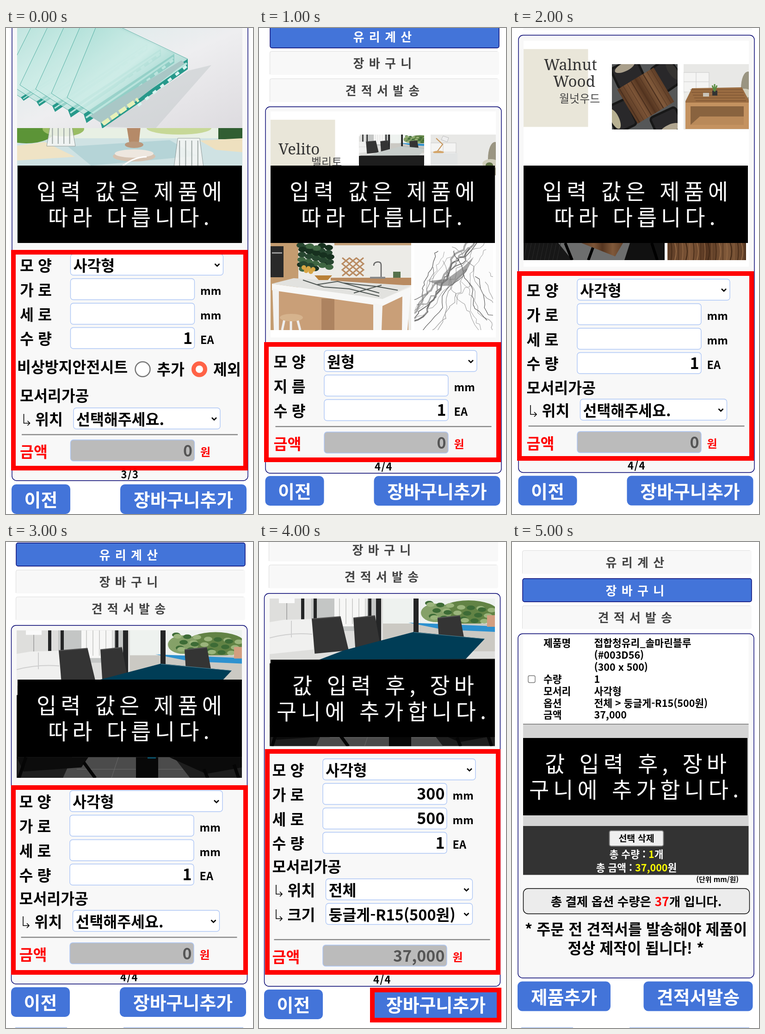
These frames come from a looping animation (534 px wide and 1049 px high, 6000 ms). An HTML page:

```html
<!DOCTYPE html>
<html lang="ko">
<head>
<meta charset="utf-8">
<style>
html, body { margin: 0; width: 100%; height: 100%; overflow: hidden; background: #fff; }
svg { display: block; }
#app { width: 100vw; height: 100vh; }
text { font-family: "Noto Sans CJK KR", "Noto Sans CJK", "Noto Sans", sans-serif; white-space: pre; }
.serif { font-family: "Noto Serif", serif; }
</style>
</head>
<body>
<svg id="app" viewBox="0 0 534 1049">
  <defs>
    <linearGradient id="glass" x1="0" y1="0" x2="1" y2="1">
      <stop offset="0" stop-color="#9fd8cf"/><stop offset=".5" stop-color="#d3efea"/><stop offset="1" stop-color="#5fb9ad"/>
    </linearGradient>
    <linearGradient id="wall" x1="0" y1="0" x2="1" y2="1">
      <stop offset="0" stop-color="#d5e9e8"/><stop offset=".5" stop-color="#eeeef0"/><stop offset="1" stop-color="#dddbdf"/>
    </linearGradient>
    <linearGradient id="wood">
      <stop offset="0" stop-color="#5b3b25"/><stop offset=".3" stop-color="#7d5537"/><stop offset=".5" stop-color="#553520"/>
      <stop offset=".75" stop-color="#80593a"/><stop offset="1" stop-color="#5e3d26"/>
    </linearGradient>
  </defs>
  <g id="stage"></g>
</svg>
<script>
const BLUE = '#4374d9', NAVY = '#000070', PANEL = '#f8f8f8', RED = '#f00';

// Basic shapes
const rect = (x, y, w, h, fill, more = '') =>
  `<rect x="${x}" y="${y}" width="${w}" height="${h}" fill="${fill}" ${more}/>`;
const poly = (fill, points, more = '') => `<polygon points="${points}" fill="${fill}" ${more}/>`;
const oval = (cx, cy, rx, ry, fill, more = '') =>
  `<ellipse cx="${cx}" cy="${cy}" rx="${rx}" ry="${ry}" fill="${fill}" ${more}/>`;
const line = (d, color, width, more = '') =>
  `<path d="${d}" fill="none" stroke="${color}" stroke-width="${width}" ${more}/>`;
const text = (x, y, s, size, fill = '#000', more = '') =>
  `<text x="${x}" y="${y}" font-size="${size}" font-weight="${size > 28 ? 900 : 700}" fill="${fill}" ${more}>${s}</text>`;
const mid = 'text-anchor="middle"', end = 'text-anchor="end"';
const repeat = (n, f) => Array.from({ length: n }, (_, i) => f(i)).join('');
const photo = (x, y, w, h, body, box = `0 0 ${w} ${h}`) =>
  `<svg x="${x}" y="${y}" width="${w}" height="${h}" viewBox="${box}">${body}</svg>`;

function random(seed) {
  return () => (seed = (seed * 16807) % 2147483647) / 2147483647;
}

// Interface parts
const panel = (x, y, bottom) =>
  rect(x, y, 510, bottom - y, PANEL, `rx="10" stroke="${NAVY}" stroke-width="1.4"`);
const frame = (x, y, w, h) => rect(x + 5, y + 5, w - 10, h - 10, 'none', `stroke="${RED}" stroke-width="10"`);
const button = (x, y, w, s) =>
  rect(x, y, w, 64, BLUE, 'rx="10"') + text(x + w / 2, y + 48, s, 39, '#fff', mid);
const buttons = (x, y) => button(x, y, 127, '이전') + button(x + 235, y, 273, '장바구니추가');
const footLines = () => rect(20, 1047.5, 112, 2, '#a9c1ee') + rect(254, 1047.5, 259, 2, '#a9c1ee');

function tab(x, y, s, on) {
  const box = on
    ? rect(x + 1, y, 495, 50, BLUE, `rx="4" stroke="${NAVY}" stroke-width="1.4"`)
    : rect(x, y, 496, 51, PANEL, 'rx="4"') + line(`M${x + .5} ${y + 50}v-46q0 -3.5 4 -3.5h488`, '#ddd', 1);
  return box + text(x + 249, y + 36, s, 26, on ? '#fff' : '#444', `${mid} letter-spacing="10.3"`);
}

function caption(x, y, a, ax, b, bx) {
  const row = (dx, dy, s) =>
    `<text x="${x + dx}" y="${y + dy}" font-size="47" letter-spacing="9" fill="#fff">${s}</text>`;
  return rect(x, y, 485, 167, '#000') + row(ax, 73, a) + row(bx, 129, b);
}
const note = () => caption(25, 297, '입력 값은 제품에', 41, '따라 다릅니다.', 66);
const addNote = (x, y) => caption(x, y, '값 입력 후, 장바', 47, '구니에 추가합니다.', 13);

const field = (x, y, w, fill = '#fff') =>
  rect(x, y - 23, w, 45.5, fill, 'rx="6" stroke="#adc6f5" stroke-width="1.4"');
const label = (x, y, s, fill) => text(x, y + 12.5, s, 32.5, fill);
const select = (x, y, w, s) => field(x, y, w) + label(x + 6, y + 1, s) +
  line(`M${x + w - 18} ${y - 2}l5 5 5 -5`, '#000', 2.6);
const input = (x, y, name, unit, value = '') => label(x + 30, y + 1, name) + field(x + 139.5, y, 268) +
  text(x + 403, y + 12, value, 34, '#000', end) + text(x + 420, y + 12, unit, 23.5);
const option = (x, y, name, s) => line(`M${x + 38.5} ${y - 10}v20h13m-5 -5l5 5 -5 5`, '#000', 1.6) +
  label(x + 63, y + 1, name) + select(x + 146, y, 317, s);
const shape = (x, y, s) => label(x + 30, y + 1, '모 양') + select(x + 139.5, y, 330, s);
const price = (x, ruleY, y, s) => rect(x + 34, ruleY - 1, 467, 2.4, '#888') + label(x + 30, y + 2, '금액', RED) +
  field(x + 139.5, y, 268, '#bbb') + text(x + 403, y + 13, s, 34, '#555', end) + text(x + 420, y + 12, '원', 24, RED);
const page = (x, y, s) => text(x + 268, y, s, 22, '#000', `${mid} letter-spacing="1.5"`);

function sizeRows(x, y, w = '', h = '') {
  return shape(x, y, '사각형') + input(x, y + 53, '가 로', 'mm', w) +
    input(x, y + 106, '세 로', 'mm', h) + input(x, y + 158.5, '수 량', 'EA', '1');
}

// Pictures
function glassSheets() {
  return rect(0, 0, 487, 216, 'url(#wall)') + poly('#c3c9cc', '185,213 370,92 420,80 300,216', 'opacity=".5"') +
    repeat(6, i => {
      const rx = 224 + 29 * i, ry = 12 + 11 * i, bx = 8 + 34 * i, by = 150 + 9 * i, t = 7 + 3 * i;
      return poly('url(#glass)', `${rx},${ry} ${bx},${by} ${bx - 70},${by - 45} ${rx - 190},${ry - 90}`, 'opacity=".75" stroke="#2f9c8e"') +
        poly('#27998b', `${rx},${ry} ${rx},${ry + t} ${bx + 6},${by + t} ${bx},${by}`) +
        line(`M${rx - 2} ${ry + t * .4}L${bx + 5} ${by + t * .4}`, '#b9e5dd', 2 + i * .5) +
        line(`M${rx - 3} ${ry + t * .7}L${bx + 80} ${by - 40 + t * .7}`, '#d9f3ef', 3 + i * .6, 'stroke-dasharray="9 12"');
    }) + poly('#a9c7c6', '157,190 355,70 362,76 190,210') +
    line('M185 207L262 154', '#e6f1b9', 9, 'stroke-dasharray="17 5"');
}

function dining() {
  const cup = (x, y, w, h) =>
    poly('#f5f7f5', `${x + w * .14},${y} ${x + w * .86},${y} ${x + w},${y + h} ${x},${y + h}`, 'opacity=".85" stroke="#87908f"') +
    repeat(4, i => line(`M${x + w * (.2 + i * .2)} ${y + 5}v${h - 10}`, '#9da6a4', 2));
  return rect(0, 0, 487, 244, '#cfe2e3') + rect(0, 0, 487, 22, '#e8f0e4') +
    oval(20, 6, 62, 27, '#5c9437') + oval(100, 2, 45, 16, '#9abd63') + oval(350, 0, 70, 14, '#c7d897') +
    rect(435, 0, 52, 24, '#315e32') +
    poly('#efe3c5', '0,38 60,30 125,62 0,70') + poly('#eee0bf', '395,27 487,22 487,52 430,47') +
    poly('#a5cbd0', '110,40 330,26 390,60 160,81', 'opacity=".6"') +
    cup(64, -12, 62, 51) + oval(253, 61, 46, 11, '#d6c3b1') + oval(253, 55, 42, 9, '#eee7df') +
    poly('#b58a68', '237,-3 267,-3 263,34 243,34') + oval(253, 36, 20, 7, '#b9977b') +
    line('M228 82q25 -20 52 -20', '#fff', 3) + cup(338, 22, 66, 70);
}

function room(top) {
  const chair = (x, y, w) => poly('#343434', `${x},${y} ${x + w * .78},${y - 5} ${x + w},${y + 68} ${x + w * .08},${y + 75}`) +
    line(`M${x} ${y}L${x + w * .78} ${y - 5}`, '#555', 2);
  return rect(0, 0, 487, 319, '#dededc') + rect(90, 0, 140, 70, '#c4c6c5') +
    rect(245, 0, 242, 60, '#eef2ef') + oval(430, 30, 65, 26, '#628345') + oval(360, 31, 33, 20, '#85a168') +
    repeat(24, i => oval(345 + i * 37 % 140, 10 + i * 17 % 40, 9, 5, i % 2 ? '#9bb57c' : '#3d6b36')) +
    rect(245, 54, 242, 60, '#cbc9c3') + poly('#2d91cf', '300,52 487,60 487,72 375,67') +
    rect(470, 36, 17, 25, '#d39e80') +
    rect(140, 0, 70, 60, '#f7f7f6') + repeat(5, i => rect(150 + i * 14, 0, 2, 55, '#cfd0ce')) +
    [68, 95, 213, 230, 311].map((x, i) => rect(x, 0, i > 2 ? 11 : 7, i > 2 ? 100 : 45, '#242526')).join('') +
    rect(20, 0, 34, 10, '#fafafa') + line('M37 10v44', '#aaa', 2) +
    poly('#f0f0ef', '0,51 30,46 95,44 95,110 0,120') + line('M0 85q45 -12 92 -8M47 48v36', '#cfcfcf', 2) +
    chair(91, 44, 80) + chair(181, 42, 60) + chair(363, 42, 62) +
    poly(top, '160,112 312,72 465,87 415,140 60,150') + line('M312 73l152 14', '#5e8796', 1) +
    poly('#1e1e1e', '0,140 60,132 487,130 487,319 0,319') +
    poly('#4b4b4b', '120,274 340,274 375,319 100,319') + line('M130 300H360M220 274l-15 45', '#686868', 1) +
    rect(258, 274, 48, 45, '#080808') + poly('#0c0c0c', '0,274 155,274 140,296 15,305') +
    poly('#0b0b0b', '330,274 487,274 487,296 410,310') +
    line('M20 274L5 319M145 285l25 34M405 300l8 19M470 290l10 29', '#050505', 7) + rect(283, 274, 18, 3, '#07516a');
}

function marble() {
  const rnd = random(71);
  const vein = (x, y, dx, dy, n, color, w) => {
    let d = `M${x} ${y}`;
    for (let i = 0; i < n; i++) d += `l${(dx + rnd() * 14 - 7).toFixed(1)} ${(dy + rnd() * 14 - 7).toFixed(1)}`;
    return line(d, color, w);
  };
  return rect(0, 0, 170, 188, '#fcfcfc') +
    repeat(5, i => vein(125 + i * 7, -5, -6, 7, 28, i % 2 ? '#777' : '#aaa', 4 - i * .7)) +
    repeat(16, i => vein(rnd() * 170, rnd() * 90, i % 2 ? -5 : 5, 8, 16, i % 3 ? '#999' : '#555', .5 + rnd())) +
    poly('#777', '30,82 70,78 108,50 128,30 112,62 82,92 55,93', 'opacity=".65"');
}

function kitchen() {
  return rect(0, 0, 304, 188, '#ecebe7') + rect(0, 0, 60, 188, '#c49c70') + rect(0, 7, 28, 67, '#292929') +
    rect(3, 20, 22, 3, '#999') + rect(138, 0, 166, 5, '#c6a27a') +
    repeat(34, i => oval(65 + i * 29 % 72, 5 + i * 19 % 53, 9, 6, ['#274630', '#3f6642', '#17301f'][i % 3])) +
    repeat(5, i => oval(72 + i * 5, 53 + i * 7 % 12, 5, 5, '#d7a544')) +
    repeat(3, i => line(`M${155 + i * 15} 32l16 13 -16 13 16 13M${171 + i * 15} 32l-16 13 16 13 -16 13`, '#b98b62', 3)) +
    line('M239 73V48q0 -8 -8 -7t-8 8', '#666', 2.5) + rect(265, 62, 16, 15, '#56714b') +
    rect(130, 75, 174, 16, '#b98b61') + rect(215, 73, 33, 4, '#888') +
    poly('#c99f78', '15,100 230,134 298,100 298,188 15,188') + rect(110, 120, 28, 68, '#ad8360') +
    poly('#e2e2df', '3,88 50,76 303,92 242,121') +
    line('M70 80l45 15 55 4 65 16M100 90l45 -7 90 25M155 86l75 8 45 8M180 108l60 -17', '#4e5552', 2) +
    poly('#f7f7f6', '3,88 242,121 303,95 303,107 242,136 3,102') +
    poly('#f2f2f1', '4,98 18,102 18,188 7,188') + poly('#f4f4f3', '222,130 242,134 240,188 222,188') +
    poly('#f7f7f7', '285,110 303,103 296,188 284,188') +
    poly('#b98037', '95,70 133,70 124,80 104,80') +
    line('M30 165l-5 23M44 165v23M58 165l6 23', '#eee', 5) + oval(45, 161, 25, 8, '#d6b38d');
}

const sideRoom = body => rect(0, 0, 141, 141, '#e8e8e6') + rect(0, 18, 55, 42, '#f4f4f3', 'stroke="#ccc"') +
  line('M0 38h55M27 18v42', '#ccc', 1) + oval(139, 52, 15, 36, '#9a9582') + oval(130, 63, 18, 10, '#d2cfbd') + body;

const lamp = () => line('M14 37l12 -16 -14 -13', '#c59255', 2) + poly('#eee', '27,3 39,7 36,16 23,11', 'stroke="#bbb"') +
  oval(17, 38, 12, 3, '#d4a66b') + rect(0, 40, 58, 25, '#e2e4e4') + oval(127, 66, 8, 6, '#637548');

const lowTable = () => poly('#9b6d42', '4,80 18,52 126,50 141,78 141,90 4,90') +
  repeat(5, i => line(`M${14 + i * 3} ${55 + i * 6}H${127 + i * 2}`, '#704a2c', 1)) +
  rect(4, 83, 137, 57, '#c49260') + rect(15, 91, 115, 40, '#89633f') + poly('#b98959', '15,131 35,113 130,113 130,131') +
  rect(62, 57, 11, 11, '#333') + line('M67 59l-5 -13M67 59v-16M67 59l5 -13', '#5b8c43', 3) +
  rect(42, 62, 13, 8, '#c9c3b8') + poly('#f0efea', '0,65 18,52 0,80', 'opacity=".5"');

function squareTable() {
  const seat = (x, y, a, c) => `<g transform="translate(${x} ${y}) rotate(${a})">` +
    rect(-30, -24, 60, 48, '#29282a', 'rx="7" stroke="#171717" stroke-width="5"') + oval(0, -15, 23, 9, c) + '</g>';
  return rect(0, 0, 142, 141, '#555758') + seat(34, 20, -25, '#a99f8b') + seat(119, 23, 55, '#353331') +
    seat(20, 112, -115, '#b8b192') + seat(119, 126, 155, '#b0a58f') +
    `<g transform="translate(73 68) rotate(-31)">${rect(-46, -43, 92, 86, 'url(#wood)')}` +
    repeat(9, i => line(`M${-41 + i * 10} -43v86`, '#492e1d', i % 3 ? .8 : 2)) + '</g>';
}

const darkTable = () => rect(0, 0, 305, 37, '#171717') + poly('#6d6e6e', '75,0 230,0 222,37 105,37') +
  poly('url(#wood)', '125,0 215,0 198,29') + poly('#111', '230,0 305,0 305,37 218,37') +
  line('M90 0l15 37M150 10l-10 27M277 0l12 37', '#000', 6) +
  repeat(9, i => line(`M${i * 9} 37l8 -37`, '#292929', 1));

const woodSwatch = () => rect(0, 0, 170, 37, 'url(#wood)') +
  repeat(22, i => line(`M${i * 8} 0q${i % 3 * 3} 18 0 37`, i % 2 ? '#402715' : '#936844', 1 + i % 3 * .5));

// Product sheet shared by two scenes
const sheet = y => rect(25, y, 487, 488, '#fff') + rect(25, y + 18, 139.5, 168, '#e9e6d9');
const title = (x, y, s) => `<text class="serif" x="${x}" y="${y}" font-size="33" fill="#333">${s}</text>`;
const subtitle = (x, y, s) => `<text x="${x}" y="${y}" font-size="24" fill="#444" font-weight="300">${s}</text>`;

const scenes = [
  () => panel(13, -20, 977) + photo(24, 0, 487, 216, glassSheets()) + photo(24, 216, 487, 244, dining()) + note() +
    sizeRows(0, 511) + label(24, 731, '비상방지안전시트') +
    oval(295.5, 736.5, 16, 16, '#fff', 'stroke="#777" stroke-width="2.5"') + label(326, 736, '추가') +
    oval(418, 736.5, 12.5, 12.5, '#fff', 'stroke="#ff6347" stroke-width="9"') + label(448, 736, '제외') +
    label(30, 793, '모서리가공') + option(0, 843, '위치', '선택해주세요.') + price(0, 877.5, 912, '0') +
    page(0, 972, '3/3') + frame(11, 479, 512, 476) + buttons(12, 985),

  () => tab(23, -7, '유리계산', true) + tab(23, 50, '장바구니') + tab(23, 109, '견적서발송') +
    panel(14, 170, 961) + sheet(180) + title(42, 273, 'Velito') + subtitle(113, 298, '벨리토') +
    photo(216, 230, 141, 141, room('#c7cdca'), '47 0 408 408') + photo(371, 230, 141, 141, sideRoom(lamp())) +
    photo(25, 464, 304, 188, kitchen()) + photo(336, 464, 170, 188, marble()) + note() +
    shape(1.5, 719, '원형') + input(1.5, 772, '지 름', 'mm') + input(1.5, 825, '수 량', 'EA', '1') +
    price(1.5, 860, 895, '0') + page(1.5, 955, '4/4') + frame(11, 678, 512, 259) + buttons(13.5, 967),

  () => rect(24, 0, 495, 5, PANEL, 'rx="3"') + panel(14, 15.5, 959.5) + sheet(27.5) +
    title(69, 91, 'Walnut') + title(89, 127, 'Wood') + subtitle(102, 161, '월넛우드') +
    photo(216, 78, 142, 141, squareTable()) + photo(371, 78, 141, 141, sideRoom(lowTable())) +
    photo(25, 464, 305, 37, darkTable()) + photo(336, 464, 171, 37, woodSwatch()) + note() +
    sizeRows(1.5, 565) + label(31.5, 776, '모서리가공') + option(1.5, 824, '위치', '선택해주세요.') +
    price(1.5, 859, 894, '0') + page(1.5, 953, '4/4') + frame(11, 525, 512, 409) + buttons(13.5, 966.5),

  () => tab(21, 2, '유리계산', true) + tab(21, 60, '장바구니') + tab(21, 118, '견적서발송') +
    panel(11.5, 180, 954) + photo(23, 190.5, 487, 318.5, room('#003d56')) + note() +
    sizeRows(-1.5, 559.5) + label(28.5, 769, '모서리가공') + option(-1.5, 818, '위치', '선택해주세요.') +
    price(-1.5, 853, 888, '0') + page(-1.5, 948, '4/4') + frame(11, 525, 512, 409) +
    buttons(11, 961) + footLines(),

  () => tab(21, -9, '장바구니') + tab(21, 49, '견적서발송') +
    panel(11.5, 111, 959) + photo(23, 122, 487, 318.5, room('#003d56')) + addNote(25, 254) +
    sizeRows(-1.5, 491, '300', '500') + label(28.5, 700, '모서리가공') + option(-1.5, 750, '위치', '전체') +
    option(-1.5, 803, '크기', '둥글게-R15(500원)') + price(-1.5, 858, 893, '37,000') +
    page(-1.5, 953, '4/4') + frame(13, 447, 509, 487) + buttons(11, 966) + frame(240, 962, 284, 75),

  () => {
    const rows = [['제품명', '접합청유리_솔마린블루'], ['', '(#003D56)'], ['', '(300 x 500)'], ['수량', '1'],
      ['모서리', '사각형'], ['옵션', '전체 &gt; 둥글게-R15(500원)'], ['금액', '37,000']];
    const tint = (s, color) => `<tspan fill="${color}">${s}</tspan>`;
    return tab(22, 18, '유리계산') + tab(22, 79, '장바구니', true) + tab(22, 137, '견적서발송') +
      panel(13, 198, 941) + rect(24, 199, 487.5, 194, '#fff') +
      rows.map(([name, s], i) => text(68, 226 + i * 25.9, name, 21.5) + text(177.5, 226 + i * 25.9, s, 21.5)).join('') +
      rect(35, 288.5, 15, 15, '#fff', 'rx="3" stroke="#777" stroke-width="1.4"') +
      rect(24, 393, 487.5, 220, '#d4d4d4') + rect(24, 392.5, 487.5, 1.2, '#555') + addNote(24, 423) +
      rect(24, 613, 487.5, 105.5, '#333') +
      rect(210.5, 623, 117, 33.5, '#efefef', 'rx="4" stroke="#777" stroke-width="2"') + text(269, 647, '선택 삭제', 19.5, '#000', mid) +
      text(269, 682, `총 수량 : ${tint('1', '#ff0')}개`, 21.5, '#fff', mid) +
      text(269, 711, `총 금액 : ${tint('37,000', '#ff0')}원`, 21.5, '#fff', mid) +
      text(490, 734, '(단위 mm/원)', 15, '#000', end) +
      rect(24.5, 748, 489, 54.5, '#ececec', 'rx="10" stroke="#000" stroke-width="1.4"') +
      text(268.5, 786, `총 결제 옵션 수량은 ${tint('37', RED)}개 입니다.`, 26.5, '#000', mid) +
      text(268, 848, '* 주문 전 견적서를 발송해야 제품이', 32.5, '#000', mid) +
      text(268, 889, '정상 제작이 됩니다! *', 32.5, '#000', mid) +
      button(12, 948.5, 201, '제품추가') + button(284.5, 948.5, 236, '견적서발송') + footLines();
  }
].map(draw => draw());

const stage = document.getElementById('stage');
let shown = -1;
function tick() {
  const i = Math.floor(performance.now() / 1000) % scenes.length;
  if (i !== shown) stage.innerHTML = scenes[shown = i];
  requestAnimationFrame(tick);
}
tick();
</script>
</body>
</html>
```
